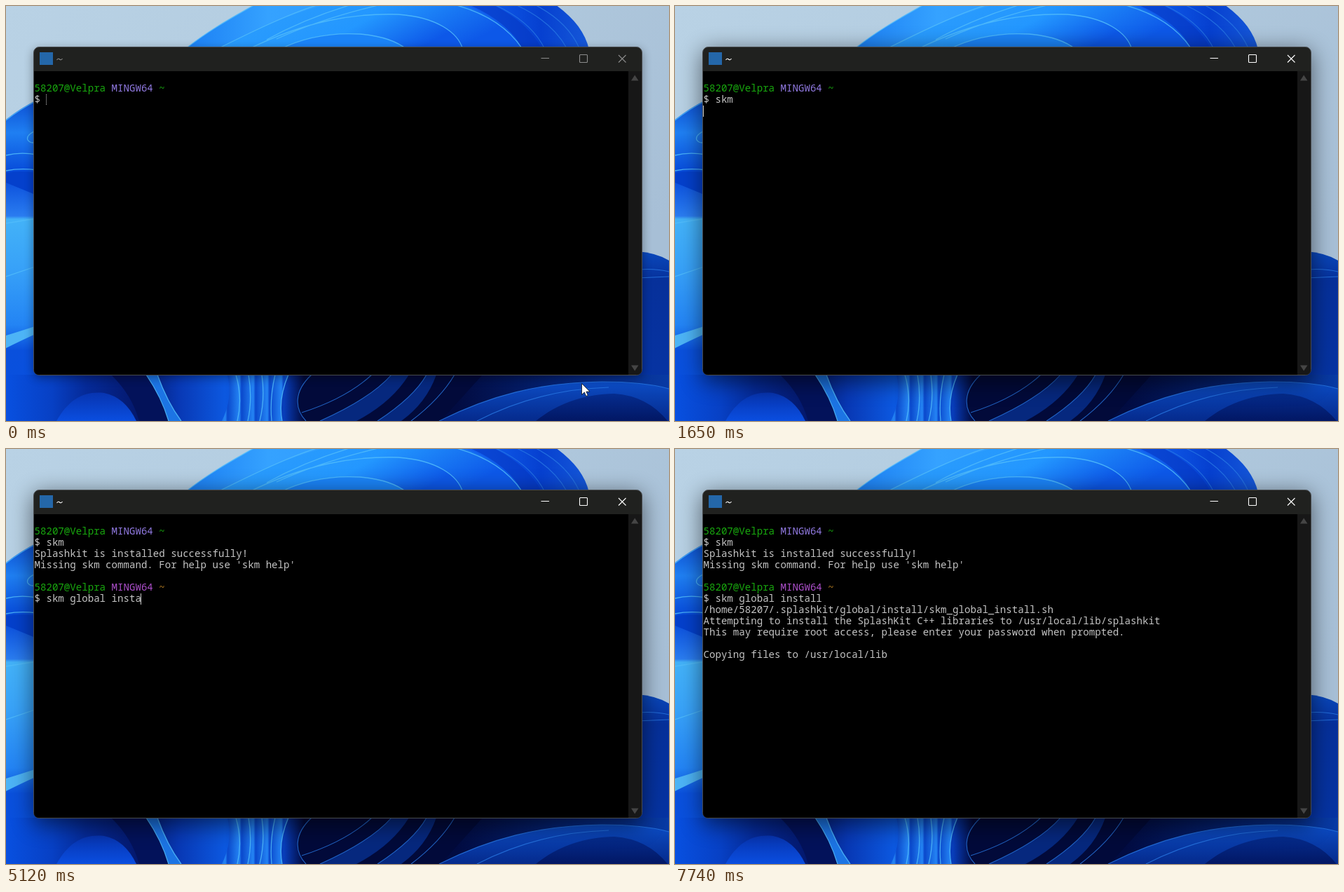
An HTML page that plays this animation: 946x592 px, repeating every 8 s.

```html
<!DOCTYPE html>
<html lang="en">
<head>
<meta charset="utf-8">
<title>Terminal session</title>
<style>
  html, body { margin: 0; width: 100%; height: 100%; overflow: hidden; background: #b0c8dc; }
  svg { display: block; }
  text { white-space: pre; font: 14.12px "Noto Sans Mono", "DejaVu Sans Mono", monospace; fill: #c4c4c4; }
  .edge { fill: none; stroke: #52bdfb; stroke-width: 1.3; opacity: .85; }
  .fine { fill: none; stroke: #2878e4; stroke-width: 1.1; opacity: .8; }
</style>
</head>
<body>
<svg width="946" height="592" viewBox="0 0 946 592">
  <defs>
    <linearGradient id="sky" x2="1" y2=".5">
      <stop stop-color="#b9d2e5"/><stop offset=".5" stop-color="#b2cbdf"/><stop offset="1" stop-color="#a7bfd6"/>
    </linearGradient>
    <linearGradient id="crown" gradientUnits="userSpaceOnUse" x1="260" x2="832">
      <stop stop-color="#1c80f4"/><stop offset=".2" stop-color="#35a2ff"/><stop offset=".5" stop-color="#2c9aff"/>
      <stop offset=".7" stop-color="#1264f4"/><stop offset=".88" stop-color="#0640d0"/><stop offset="1" stop-color="#1658d8"/>
    </linearGradient>
    <linearGradient id="lobe" x2="1" y2=".3">
      <stop stop-color="#2f9ffb"/><stop offset=".55" stop-color="#2397ff"/><stop offset="1" stop-color="#0d58e8"/>
    </linearGradient>
    <linearGradient id="side" gradientUnits="userSpaceOnUse" y1="135" y2="592" x2="0">
      <stop stop-color="#0d50d4"/><stop offset=".1" stop-color="#1f7ff2"/><stop offset=".23" stop-color="#0648d8"/>
      <stop offset=".36" stop-color="#2a7cf0"/><stop offset=".37" stop-color="#43b2f8"/><stop offset=".52" stop-color="#38a2f8"/>
      <stop offset=".7" stop-color="#2384f4"/><stop offset=".78" stop-color="#0a50dc"/><stop offset="1" stop-color="#0850e0"/>
    </linearGradient>
    <linearGradient id="floor" gradientUnits="userSpaceOnUse" x2="946">
      <stop stop-color="#0850e0"/><stop offset=".07" stop-color="#0740c4"/><stop offset=".12" stop-color="#052a98"/>
      <stop offset=".2" stop-color="#04186c"/><stop offset=".26" stop-color="#0838b4"/><stop offset=".33" stop-color="#0c58e0"/>
      <stop offset=".42" stop-color="#083cb8"/><stop offset=".45" stop-color="#020a3c"/><stop offset=".68" stop-color="#020c42"/>
      <stop offset=".85" stop-color="#042478"/><stop offset="1" stop-color="#083aa4"/>
    </linearGradient>
    <linearGradient id="fold" gradientUnits="userSpaceOnUse" x1="316" x2="336" spreadMethod="repeat">
      <stop stop-color="#0a48cc"/><stop offset=".85" stop-color="#2484f4"/><stop offset="1" stop-color="#0a48cc"/>
    </linearGradient>
    <linearGradient id="right" gradientUnits="userSpaceOnUse" y1="350" y2="560" x2="0">
      <stop stop-color="#0a48bc"/><stop offset=".2" stop-color="#06309a"/><stop offset="1" stop-color="#0634a4"/>
    </linearGradient>
    <linearGradient id="band" x2="0" y2="1">
      <stop stop-color="#0c4cc4"/><stop offset="1" stop-color="#052a8c"/>
    </linearGradient>
    <linearGradient id="dome" x2="0" y2="1">
      <stop stop-color="#052c8e"/><stop offset="1" stop-color="#021764"/>
    </linearGradient>
    <linearGradient id="mound" x2="0" y2="1">
      <stop stop-color="#0734b0"/><stop offset="1" stop-color="#0a4ee0"/>
    </linearGradient>
    <filter id="soft" x="-20%" y="-20%" width="140%" height="140%"><feGaussianBlur stdDeviation="7"/></filter>
    <filter id="deep" x="-20%" y="-20%" width="140%" height="140%"><feGaussianBlur stdDeviation="16"/></filter>
  </defs>

  <!-- wallpaper -->
  <rect width="946" height="592" fill="url(#sky)"/>
  <g>
    <path d="M255 62C295 30 335 10 362-6H778C808 14 826 36 832 62Z" fill="url(#crown)"/>
    <path class="edge" d="M255 62C295 30 335 10 362-6"/>
    <path class="fine" d="M750-4Q800 20 818 60M722-4Q778 20 800 60M692-4Q748 20 768 60"/>
    <path d="M690-4Q742 20 764 60H736Q715 20 655-4Z" fill="#0638c4" opacity=".6"/>
    <path d="M300 62C380 22 450-10 520-10H620C690 5 725 35 737 62Z" fill="url(#lobe)"/>
    <path class="edge" d="M300 62C380 22 430 0 470-8M622-6Q702 10 736 60"/>
    <path d="M345 62C430 20 500 10 560 12C615 16 645 38 652 62Z" fill="url(#lobe)"/>
    <path class="edge" d="M345 62C430 20 500 10 560 12C615 16 645 38 652 62M372 48Q430 16 500-4M386 47Q450 18 535-2"/>
    <path d="M390 62C430 42 470 38 505 40C540 43 560 52 572 62Z" fill="#1b84f8"/>
    <path class="edge" d="M390 62C430 42 470 38 505 40C540 43 560 52 572 62"/>
  </g>
  <g>
    <path d="M0 162Q20 146 44 134V592H0Z" fill="url(#side)"/>
    <path class="edge" d="M0 163Q20 147 44 135M44 177Q28 184 31 191Q35 197 44 194M0 213Q20 208 44 212M0 235Q20 231 44 234M0 310L44 303M0 386L44 371"/>
    <path d="M0 238Q20 234 44 238V270L0 252Z" fill="#0440cc"/>
    <path d="M0 470Q20 464 44 456V467Q20 478 0 488Z" fill="#4db4f6"/>
  </g>
  <g>
    <path d="M900 350Q928 352 946 363V592H900Z" fill="url(#right)"/>
    <path class="fine" d="M900 376Q928 374 946 379M900 388L946 386" opacity=".7"/>
  </g>
  <g>
    <path d="M0 526H946V592H0Z" fill="url(#floor)"/>
    <path d="M72 592C90 560 112 549 140 552Q170 558 186 592Z" fill="url(#mound)"/>
    <path d="M150 526H206L234 592H190Q180 555 150 526Z" fill="#03125a"/>
    <path d="M200 526H216Q230 565 250 592H232Q222 558 200 526Z" fill="#1c74e4"/>
    <path class="edge" d="M200 526Q222 558 232 592M216 526Q230 565 250 592"/>
    <path d="M316 526H403Q388 560 394 592H308Q324 560 316 526Z" fill="url(#fold)"/>
    <path class="edge" d="M328 526Q338 560 330 592M346 526Q352 560 345 592M365 526Q370 560 362 592M384 526Q376 560 379 592M403 526Q388 560 394 592"/>
    <path d="M436 526C410 550 412 575 428 592H620L680 526Z" fill="#020a3a"/>
    <path d="M448 592Q520 560 550 526H575Q550 566 500 592ZM530 592Q582 558 600 526H614Q600 566 564 592Z" fill="#06287e"/>
    <path class="fine" d="M436 526C410 550 412 575 428 592M422 580Q485 560 522 526M448 592Q520 560 550 526M530 592Q582 558 600 526M578 592Q620 560 640 526"/>
    <path d="M618 592C690 556 760 537 850 536Q910 536 946 546V592Z" fill="url(#band)"/>
    <path d="M756 592C788 566 825 554 868 553Q915 556 944 592Z" fill="url(#dome)"/>
    <path class="fine" d="M618 592C690 556 760 537 850 536Q910 536 946 546M672 592C730 562 790 546 860 544"/>
  </g>

  <!-- window -->
  <rect id="idleShade" x="39" y="62" width="869" height="468" rx="8" opacity=".38" filter="url(#soft)"/>
  <rect id="liveShade" x="39" y="64" width="869" height="472" rx="8" opacity=".55" filter="url(#deep)"/>
  <rect x="39.5" y="58.5" width="868" height="468" rx="8" fill="#20211f" stroke="#484b4e"/>
  <path d="M40 93H888V526H47Q40 526 40 519Z"/>
  <path d="M888 93H907V519Q907 526 900 526H888Z" fill="#171717"/>
  <path d="M892 106.5H902.5L897.2 98.5ZM892 512.5H902.5L897.2 520.5Z" fill="#454545"/>
  <rect x="48" y="66" width="19" height="18" fill="#2467a9"/>
  <g id="chrome" fill="none" stroke-width="1.1">
    <path d="M763.5 74.5H775M874 70L884.5 80.5M884.5 70L874 80.5"/>
    <rect x="818.5" y="69.5" width="11" height="11" rx="1"/>
    <path d="M72.5 77Q74.5 74 76.5 76T80.5 75"/>
  </g>
  <g id="lines"></g>
  <path id="caret" stroke="#c8c8c8"/>

  <!-- pointer -->
  <circle id="click" cx="306.5" cy="219" r="14" fill="#808000"/>
  <path id="beam" d="M-3-7.5H-1L0-6.5L1-7.5H3M0-6.5V6.5M-3 7.5H-1L0 6.5L1 7.5H3" fill="none" stroke="#f4f4f4" stroke-width="1.2"/>
  <path id="arrow" d="M0 0V16L3.8 12.4L6.2 18L8.8 17L6.4 11.6H11.5Z" fill="#fff" stroke="#111" stroke-width=".8"/>
</svg>
<script>
const LOOP = 8000, LEFT = 40.5, CELL = 8.472, ROW = 16;
const ACTIVE = 260;
const $ = id => document.getElementById(id);
const show = (el, on) => el.setAttribute('visibility', on ? 'visible' : 'hidden');

const keys = {
  first: [790, 1050, 1310],
  second: [2510, 2710, 2920, 3210, 3540, 3670, 3800, 4000, 4140,
           4270, 4400, 4530, 4790, 4920, 5060, 5120, 5320, 5520]
};
const typed = (list, t) => list.filter(k => k <= t).length;

// Adds one terminal row made of [text, colour] runs, visible from the given time.
const rows = [];
function addRow(row, at, ...runs) {
  const el = document.createElementNS('http://www.w3.org/2000/svg', 'text');
  el.setAttribute('x', LEFT);
  el.setAttribute('y', 122 + row * ROW);
  for (const [text, fill] of runs) {
    const run = document.createElementNS(el.namespaceURI, 'tspan');
    run.textContent = text;
    if (fill) run.style.fill = fill;
    el.append(run);
  }
  $('lines').append(el);
  rows.push({ el, at });
  return el;
}
const addPrompt = (row, at, system, tilde) =>
  addRow(row, at, ['58207@Velpra ', '#18a80e'], ['MINGW64 ', system], ['~', tilde]);

addPrompt(0, 0, '#9079e0', '#18a80e');
const firstCommand = addRow(1, 0, ['$ ']);
addRow(2, 1840, ['Splashkit is installed successfully!']);
addRow(3, 1840, ["Missing skm command. For help use 'skm help'"]);
addPrompt(5, 1840, '#ad4fcb', '#b57c22');
const secondCommand = addRow(6, 1840, ['$ ']);
addRow(7, 5990, ['/home/58207/.splashkit/global/install/skm_global_install.sh']);
addRow(8, 6190, ['Attempting to install the SplashKit C++ libraries to /usr/local/lib/splashkit']);
addRow(9, 6190, ['This may require root access, please enter your password when prompted.']);
addRow(11, 6190, ['Copying files to /usr/local/lib']);

function caretCell(t) {
  if (t < 1650) return [1, 2 + typed(keys.first, t)];
  if (t < 1840) return [2, 0];
  if (t < 5780) return [6, 2 + typed(keys.second, t)];
  return [t < 5990 ? 7 : t < 6190 ? 8 : 12, 0];
}
const caretOff = t => (t >= 2310 && t < 2510) || (t >= 6730 && t < 7240) || t >= 7740;

const mix = (a, b, p) => a + (b - a) * p;

// Pointer position, or null while it is hidden.
function pointer(t) {
  if (t < 790) {
    const p = [0, .3, .7, 1][typed([70, 130, 200], t)];
    return [mix(821.5, 309, p), mix(538.5, 219.5, p)];
  }
  if (t < 6730 || t >= 7400) return null;
  const p = Math.floor((t - 6730) / 67) / 9;
  const eased = p * p * (3 - 2 * p);
  return [mix(309, 538, eased), mix(221, 557, eased)];
}

function draw(t) {
  const active = t >= ACTIVE;
  show($('idleShade'), !active);
  show($('liveShade'), active);
  $('chrome').setAttribute('stroke', active ? '#fff' : '#8c8c8c');

  for (const { el, at } of rows) show(el, t >= at);
  firstCommand.textContent = '$ ' + 'skm'.slice(0, typed(keys.first, t));
  secondCommand.textContent = '$ ' + 'skm global install'.slice(0, typed(keys.second, t));

  const [row, col] = caretCell(t);
  const x = Math.floor(LEFT + col * CELL) + .5, y = 110 + row * ROW;
  $('caret').setAttribute('d', `M${x} ${y}v${ROW}`);
  $('caret').setAttribute('stroke-dasharray', active ? 'none' : '1 1');
  show($('caret'), !caretOff(t));

  const at = pointer(t);
  const inside = at && at[1] < 526;
  show($('click'), active && t < 340);
  show($('beam'), inside);
  show($('arrow'), at && !inside);
  if (at) $(inside ? 'beam' : 'arrow').setAttribute('transform', `translate(${at})`);
}

function tick() {
  draw(performance.now() % LOOP);
  requestAnimationFrame(tick);
}
tick();
</script>
</body>
</html>
```
